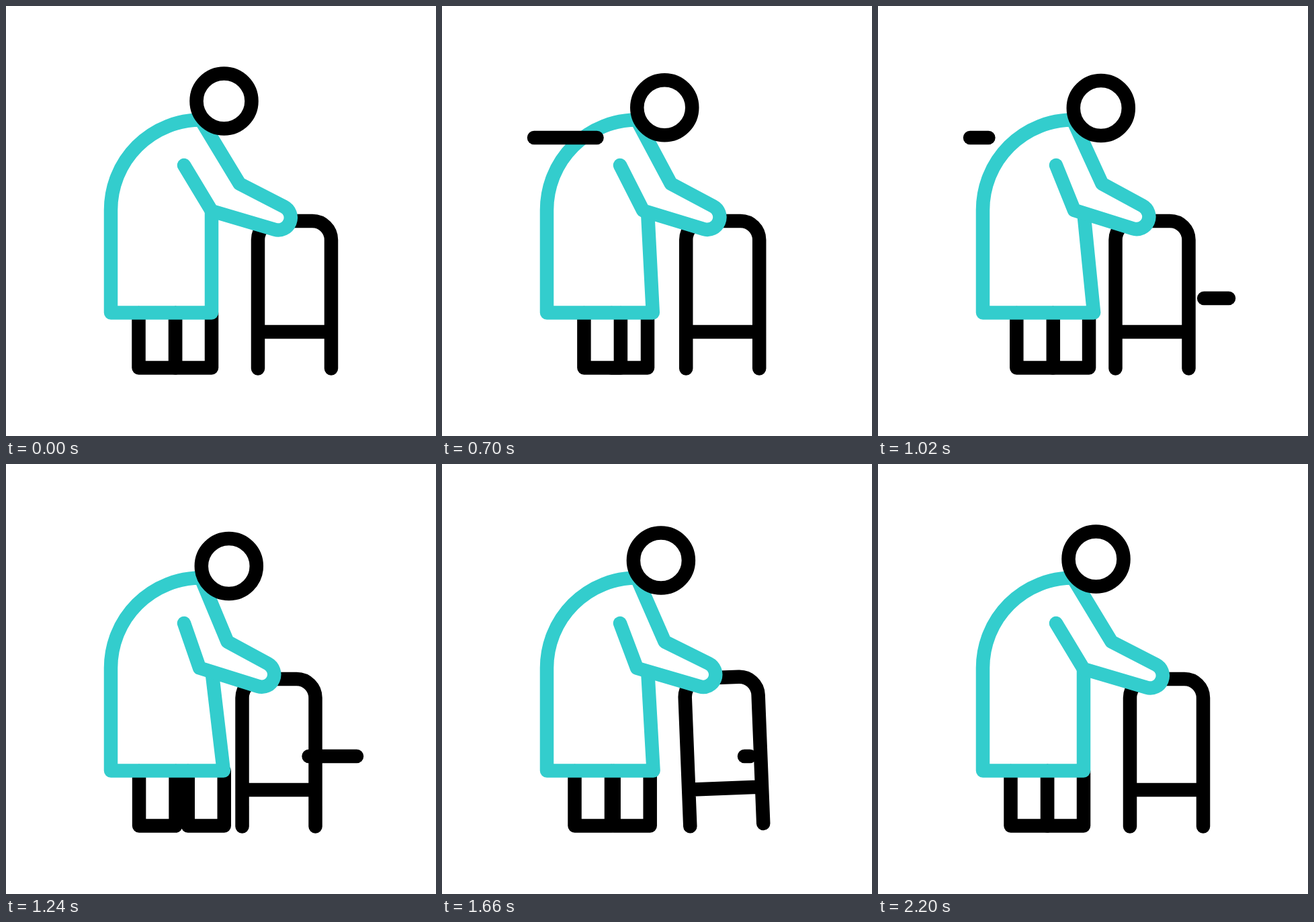
An HTML page for the animation above (2400 ms loop, 640 by 640 pixels).

```html
<!DOCTYPE html>
<html lang="en">
<head>
<meta charset="utf-8">
<title>Walking with a frame</title>
<style>
  html, body { margin: 0; width: 100%; height: 100%; overflow: hidden; background: #fff; }
  svg { display: block; width: 100vw; height: 100vh; }
  path, circle { fill: #fff; stroke: #000; stroke-width: 20.5; stroke-linecap: round; stroke-linejoin: round; }
  .cloth { stroke: #33cdcd; }
  .open { fill: none; }
</style>
</head>
<body>
<svg viewBox="0 0 640 640">
  <path id="rightLeg" d="M252 457V538.5H306V457"/>
  <path id="leftLeg" d="M197.5 457V538.5H252V457"/>
  <path id="walker" class="open" d="M375 539.5V348a28 28 0 0 1 28 -28H456a28 28 0 0 1 28 28V539.5M375 485H484"/>
  <path id="coat" class="cloth open"/>
  <path id="arm" class="cloth"/>
  <circle id="head" r="41"/>
  <path id="backLine" class="open"/>
  <path id="frontLine" class="open"/>
</svg>
<script>
const LOOP = 2400;
const HAND_R = 18.5;
const el = id => document.getElementById(id);
const set = (id, name, value) => el(id).setAttribute(name, value);
const shift = (id, x, y = 0) => set(id, 'transform', `translate(${x} ${y})`);

// Smooth 0 to 1 between times a and b
function ease(t, a, b) {
  const p = Math.min(1, Math.max(0, (t - a) / (b - a)));
  return p * p * (3 - 2 * p);
}

// Up during a..b, back down during c..d
const pulse = (t, a, b, c, d) => ease(t, a, b) - ease(t, c, d);

// Horizontal dash that grows leftward, then shrinks from its right end
function dash(id, t, right, y, length, start) {
  const tail = right - length * ease(t, start + 500, start + 1000);
  const tip = right - length * ease(t, start, start + 500);
  set(id, 'd', tail - tip > 0.05 ? `M${tail} ${y}H${tip}` : '');
}

function drawArm(bend, reach) {
  const x = 405.3 - reach, y = 315 - bend * 0.1;
  const elbow = [347.5 - bend, 264.5], inner = [306 - bend, 305 - bend * 0.08];
  // Points where the sleeve edges meet the round hand
  const edge = (from, nx, ny) => {
    const dx = x - from[0], dy = y - from[1], len = Math.hypot(dx, dy);
    const turn = Math.asin(HAND_R / len) * nx;
    const a = Math.atan2(dy, dx) + turn;
    const run = Math.sqrt(len * len - HAND_R * HAND_R);
    return [from[0] + run * Math.cos(a), from[1] + run * Math.sin(a)];
  };
  const top = edge(elbow, -1), low = edge(inner, 1);
  set('arm', 'd', `M290 169.5L${elbow}L${top}A${HAND_R} ${HAND_R} 0 0 1 ${low}L${inner}L265 237`);
}

function draw(t) {
  const nod = pulse(t, 200, 800, 1240, 1825);
  shift('head', 324.5 + 7.3 * nod, 141.5 + 10.5 * nod);

  shift('leftLeg', 15 * pulse(t, 200, 800, 800, 1300));
  shift('rightLeg', 19.5 * pulse(t, 800, 1300, 1300, 1800));

  const slide = -23.5 * pulse(t, 200, 1200, 1330, 2180);
  const tilt = -2.8 * pulse(t, 1220, 1830, 1830, 2200);
  set('walker', 'transform', `translate(${slide} 0) rotate(${tilt} 375 290)`);

  const hem = 306 + 18 * pulse(t, 200, 1300, 1300, 2000);
  set('coat', 'd', `M290 169.5A134 134 0 0 0 156 303.5V456.5H${hem}L306 305`);
  drawArm(19.5 * pulse(t, 200, 1460, 1460, 2200), 25 * pulse(t, 200, 1330, 1330, 2180));

  dash('backLine', t, 230.5, 196, 93.5, 200);
  dash('frontLine', t, 522, 435, 72, 767);
}

function tick() {
  draw(performance.now() % LOOP);
  requestAnimationFrame(tick);
}
tick();
</script>
</body>
</html>
```
